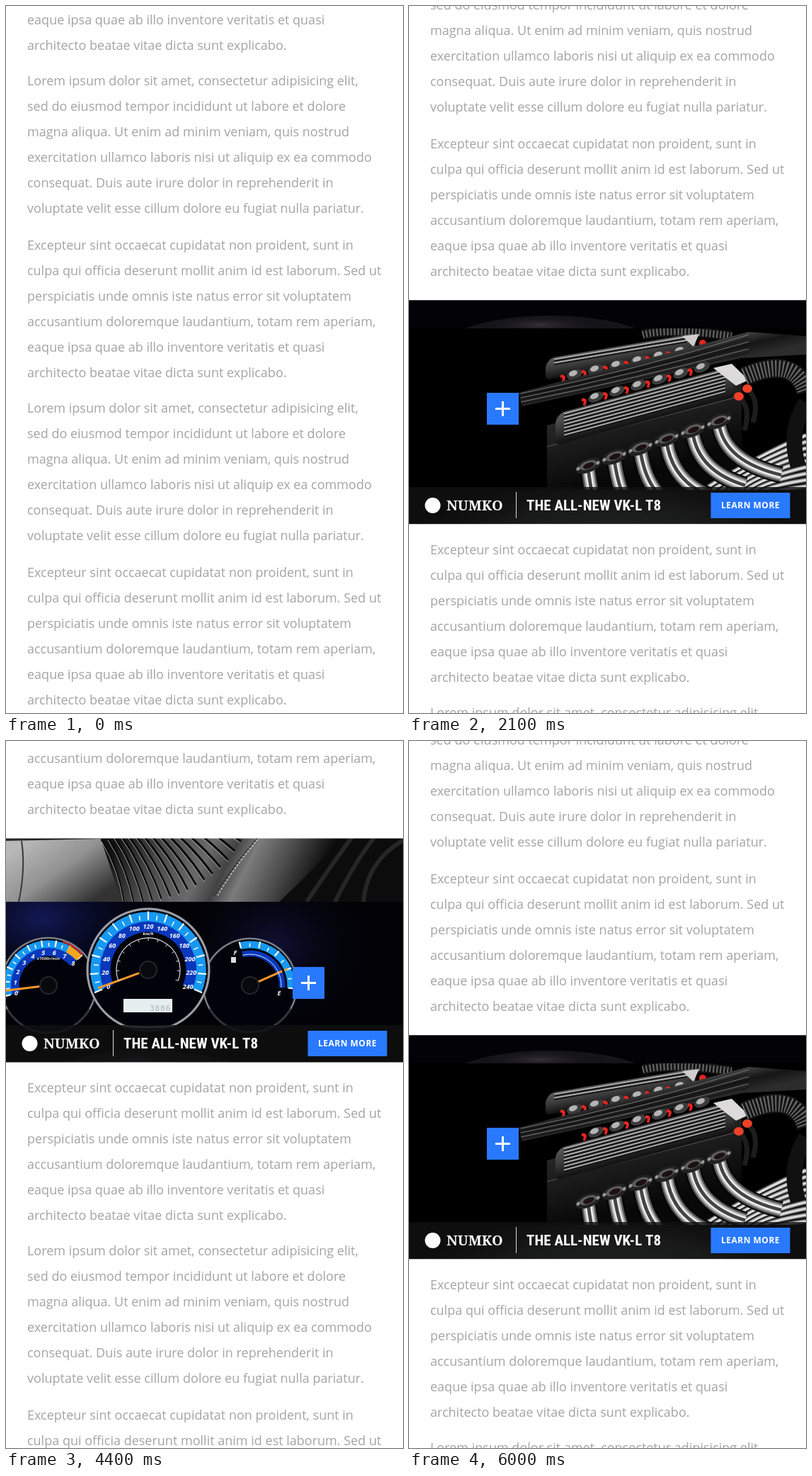
Recreate the animation shown at these times as an HTML page with a canvas. Size 561 by 998 pixels, loop 8 s.

```html
<!DOCTYPE html>
<html lang="en">
<head>
<meta charset="utf-8">
<title>Scrolling page with banner</title>
<style>
html, body { margin: 0; width: 100%; height: 100%; overflow: hidden; background: #fff; }
canvas { display: block; width: 561px; height: 998px; }
</style>
</head>
<body>
<canvas id="stage" width="561" height="998"></canvas>
<script>
const W = 561, H = 998, LOOP = 8000, BANNER = 316, BAR = 52;
const BLUE = '#2979ff';
const stage = document.getElementById('stage').getContext('2d');
const backdrop = document.createElement('canvas');
backdrop.width = W;
backdrop.height = H;
let c = backdrop.getContext('2d');

// ---------- helpers ----------
const repeat = (n, f) => { for (let i = 0; i < n; i++) f(i, i / (n - 1)); };
const rad = deg => deg * Math.PI / 180;
const polar = (x, y, r, deg) => [x + r * Math.cos(rad(deg)), y + r * Math.sin(rad(deg))];
const bend = (a, b, d, t) => a.map((v, i) => (1 - t) ** 2 * v + 2 * t * (1 - t) * b[i] + t * t * d[i]);

function rect(x, y, w, h, fill) {
  c.fillStyle = fill;
  c.fillRect(x, y, w, h);
}
function linear(x0, y0, x1, y1, ...colors) {
  const g = c.createLinearGradient(x0, y0, x1, y1);
  colors.forEach((col, i) => g.addColorStop(i / (colors.length - 1), col));
  return g;
}
// Path through midpoints, so that inner points act as soft corners.
function trace(p) {
  const n = p.length;
  c.beginPath();
  c.moveTo(p[0], p[1]);
  if (n === 4) c.lineTo(p[2], p[3]);
  for (let i = 2; i < n - 2; i += 2) {
    const k = i === n - 4 ? 1 : 0.5;
    c.quadraticCurveTo(p[i], p[i + 1], p[i] + (p[i + 2] - p[i]) * k, p[i + 1] + (p[i + 3] - p[i + 1]) * k);
  }
}
function blob(fill, ...p) {
  trace(p);
  c.fillStyle = fill;
  c.fill();
}
function poly(fill, ...p) {
  c.beginPath();
  for (let i = 0; i < p.length; i += 2) c.lineTo(p[i], p[i + 1]);
  c.fillStyle = fill;
  c.fill();
}
function line(color, width, ...p) {
  trace(p);
  c.strokeStyle = color;
  c.lineWidth = width;
  c.stroke();
}
function dashed(pattern, ...args) {
  c.setLineDash(pattern);
  line(...args);
  c.setLineDash([]);
}
function disc(x, y, r, fill, ry = r, turn = 0) {
  c.beginPath();
  c.ellipse(x, y, r, ry, turn, 0, 7);
  c.fillStyle = fill;
  c.fill();
}
function arc(x, y, r, from, to, color, width) {
  c.beginPath();
  c.arc(x, y, r, rad(from), rad(to));
  c.strokeStyle = color;
  c.lineWidth = width;
  c.stroke();
}
function ray(x, y, deg, r0, r1, color, width) {
  line(color, width, ...polar(x, y, r0, deg), ...polar(x, y, r1, deg));
}
function glow(x, y, rx, ry, ...colors) {
  c.save();
  c.translate(x, y);
  c.scale(1, ry / rx);
  const g = c.createRadialGradient(0, 0, 0, 0, 0, rx);
  colors.concat('rgba(0,0,0,0)').forEach((col, i) => g.addColorStop(i / colors.length, col));
  disc(0, 0, rx, g);
  c.restore();
}
function label(text, x, y, font, fill = '#fff', align = 'left', gap = 0) {
  c.font = font;
  c.textAlign = align;
  c.letterSpacing = gap + 'px';
  c.fillStyle = fill;
  c.fillText(text, x, y);
}
// Draws in a frame at x, y whose horizontals rise or fall by the slope.
function slanted(x, y, slope, draw) {
  c.save();
  c.transform(1, slope, 0, 1, x, y);
  draw();
  c.restore();
}
function scene(y, h, draw) {
  c.save();
  c.beginPath();
  c.rect(0, y, W, h);
  c.clip();
  rect(0, y, W, h, '#000');
  draw();
  c.restore();
}
function plus(x, y) {
  rect(x, y, 45, 45, BLUE);
  rect(x + 12, y + 21, 21, 3, '#fff');
  rect(x + 21, y + 12, 3, 21, '#fff');
}

// ---------- backdrop scenes ----------
function seat() {
  rect(0, 0, W, 227, '#0c0c0c');
  // console
  slanted(0, 38, -0.12, () => {
    rect(0, 0, 190, 46, '#242424');
    rect(0, 0, 55, 28, '#b0b0b0');
    rect(0, 9, 48, 11, '#181818');
    repeat(3, i => rect(72 + i * 38, 8, 26, 22, linear(0, 8, 0, 30, '#999', '#222')));
    rect(0, 50, 190, 3, '#777');
  });
  line('#050505', 18, 92, 8, 125, 14, 142, 34);
  line('#888', 2, 76, 4, 115, 2, 140, 20);
  // near cushion
  blob(linear(60, 82, 80, 138, '#484848', '#141414'), 0, 95, 80, 70, 214, 106, 190, 142, 0, 142);
  line('#777', 1, 80, 83, 104, 105, 128, 136);
  dashed([3, 2], '#999', 1, 88, 84, 150, 90, 212, 110);
  poly(linear(30, 140, 100, 240, '#b8b8b8', '#919191', '#333'), 0, 141, 134, 138, 164, 227, 0, 227);
  line('#3a3a3a', 2, 22, 141, 28, 180, 18, 227);
  // seat back
  poly(linear(230, 20, 400, 60, '#2c2c2c', '#8a8a8a', '#3c3c3c'), 232, 0, 430, 0, 380, 78, 240, 60);
  glow(335, 18, 70, 36, 'rgba(175,175,175,.7)');
  blob(linear(190, 40, 250, 62, '#141414', '#4c4c4c', '#111'), 190, 95, 190, 45, 222, 0, 285, 0, 248, 50, 214, 106);
  // pleats fan out from the backrest to the front edge
  poly(linear(170, 110, 340, 190, '#111', '#4a4a4a', '#6a6a6a', '#1a1a1a'), 134, 138, 214, 106, 244, 58, 378, 80, 284, 227, 164, 227);
  repeat(19, (i, t) => {
    const [x0, y0] = bend([242, 60], [216, 118], [135, 139], t);
    const [x1, y1] = bend([374, 84], [290, 236], [166, 227], t);
    const mx = (x0 + x1) / 2 + 8, my = (y0 + y1) / 2 - 5;
    line('#080808', 3, x0, y0, mx, my, x1, y1);
    line('#a0a0a0', 1, x0, y0 + 3, mx, my + 3, x1, y1 + 3);
  });
  // side bolster
  blob(linear(320, 110, 450, 175, '#151515', '#7c7c7c', '#484848', '#0c0c0c'), 284, 227, 310, 170, 380, 76, 500, 50, 552, 10, 480, 140, 386, 227);
  poly(linear(400, 0, 530, 40, '#6a6a6a', '#1c1c1c'), 408, 0, 546, 0, 506, 48, 380, 76, 432, 18);
  dashed([3, 2], '#ddd', 1, 380, 75, 500, 55, 536, 8);
  repeat(2, i => dashed([3, 2], i ? '#ccc' : '#222', 1.5, 428 + i * 5, 68, 355, 125, 294 + i * 5, 218));
  // door side
  repeat(3, i => line('#262626', 6, 561, 50 + i * 45, 510, 100 + i * 35, 425 + i * 40, 227));
  plus(258, 91);
}

function dial(d) {
  const { x, y, r, from, to, ticks, labels = [], reach } = d, span = to - from;
  disc(x, y, r, '#02030a');
  arc(x, y, r, 0, 360, '#30343c', 3);
  arc(x, y, r, 150, 390, '#7f858f', 2);
  arc(x, y, r * 0.72, from, to, '#0a37bb', r * 0.2);
  arc(x, y, r * 0.87, from, to, '#1698f2', r * 0.16);
  repeat(ticks, (i, t) => ray(x, y, from + span * t, r * 0.82, r * (i % 2 ? 0.9 : 0.96), '#fff', i % 2 ? 1.5 : 2.2));
  labels.forEach((text, i) => {
    const [u, v] = polar(x, y, reach, from + span * i / (labels.length - 1));
    label(text, u, v + 3, 'italic bold 9px "Open Sans", sans-serif', '#fff', 'center');
  });
  ray(x, y, d.needle, r * 0.16, r * d.length, '#ff9a2c', 3);
  disc(x, y, 13, '#25262c');
  disc(x, y, 11, '#08090d');
}
function dashboard() {
  rect(0, 227, W, 228, '#020207');
  glow(50, 250, 210, 130, 'rgba(22,30,105,.8)');
  glow(380, 290, 150, 130, 'rgba(20,20,64,.8)');
  const note = 'italic bold 6px "Open Sans", sans-serif';

  const rev = { x: 60, y: 345, r: 67, from: 166, to: 318 };
  dial({ ...rev, ticks: 17, labels: [...Array(9).keys()], reach: 47, needle: 173, length: 0.9 });
  arc(rev.x, rev.y, 58, 298, 318, '#f4a51c', 10);
  arc(rev.x, rev.y, 65, 288, 318, '#d72929', 2);
  label('x1000r/min', 60, 309, note, '#ddd', 'center');

  dial({ x: 345, y: 345, r: 66, from: 256, to: 364, ticks: 9, needle: 336, length: 0.87 });
  arc(345, 345, 51, 256, 364, '#02030a', 3);
  arc(345, 345, 44, 256, 364, '#c3e5ff', 1);
  label('F', 324, 302, 'italic bold 9px "Open Sans", sans-serif', '#fff', 'center');
  label('E', 386, 359, 'italic bold 9px "Open Sans", sans-serif', '#fff', 'center');
  rect(318, 305, 7, 8, '#ddd');

  const speed = [...Array(13)].map((_, i) => i * 20);
  dial({ x: 201, y: 323, r: 86, from: 157, to: 383, ticks: 25, labels: speed, reach: 61, needle: 160, length: 0.88 });
  arc(201, 323, 86, 114, 426, '#9a9fa8', 3);
  arc(201, 323, 45, 160, 380, '#d9dde4', 1.2);
  repeat(13, (i, t) => ray(201, 323, 160 + 220 * t, 41, 45, '#d9dde4', 1));
  label('km/h', 201, 274, note, '#fff', 'center');
  line('#9b9fa6', 3, 165, 402, 201, 406, 237, 402);
  rect(166, 364, 69, 19, '#e6eef0');
  label('3886', 203, 381, '11px "DejaVu Sans Mono", monospace', '#aab2b5', 'left', 1);

  disc(200, 482, 150, '#15151a', 45);
  glow(185, 450, 95, 16, 'rgba(75,65,78,.6)');
  plus(405, 319);
}

// A round tube is a stack of ever thinner strokes.
function tube(width, shades, ...p) {
  shades.forEach((shade, i) => line(shade, width * (1 - i / shades.length), ...p));
}
function hose(width, ...p) {
  line('#141414', width, ...p);
  dashed([2, 3], '#6a6a6a', width - 4, ...p);
}
function cover(w, h, ribs) {
  c.beginPath();
  c.roundRect(0, 0, w, h, [14, 6, 6, 6]);
  c.fillStyle = linear(0, 0, 0, h, '#5c5c5c', '#3a3a3a', '#111');
  c.fill();
  repeat(ribs, i => {
    line('#b4b4b4', 1.8, 12, 3 + i * 5, w - 12, 3 + i * 5);
    line('#151515', 2, 12, 5 + i * 5, w - 12, 5 + i * 5);
  });
}
function coils(x, y, slope) {
  slanted(x, y, slope, () => repeat(6, i => {
    disc(i * 30, 0, 11, '#3c3c3c', 7);
    disc(i * 30 - 2, -2, 6, '#b4b4b4', 4);
    line('#e5261f', 4, i * 30 - 20, -2, i * 30 - 12, 0, i * 30 - 17, 7);
  }));
}
function engine() {
  hose(14, 330, 464, 370, 454, 456, 466);
  slanted(193, 498, -0.17, () => cover(212, 30, 2));
  poly('#d0cccc', 386, 466, 410, 463, 402, 481);
  disc(415, 476, 5, '#e5261f');
  coils(234, 520, -0.22);
  poly(linear(300, 500, 308, 535, '#444', '#161616', '#2c2c2c'), 154, 546, 480, 460, 561, 466, 561, 492, 470, 497, 160, 565);
  repeat(6, i => line(i % 2 ? '#111' : '#777', 1, 158, 547 + i * 3, 320, 514 + i * 3, 480, 464 + i * 5));
  coils(264, 552, -0.28);
  // block
  slanted(195, 592, -0.26, () => {
    rect(0, 0, 275, 170, linear(0, 0, 0, 100, '#262626', '#080808'));
    line('#555', 1, 0, 30, 270, 30);
  });
  slanted(207, 576, -0.27, () => cover(252, 44, 7));
  // exhaust
  repeat(9, i => tube(9, ['#111', '#777', '#ddd'], 390 + i * 14, 700, 480, 640 + i * 6, 561, 606 + i * 9));
  repeat(6, j => {
    const i = 5 - j, x = 253 + i * 37, y = 649 - i * 12.6, reach = 18 + i * 14;
    tube(24, ['#050505', '#5a5a5a', '#b0b0b0', '#f0f0f0', '#444'], x, y + 4, x + 8, y + 62 - i, x + reach, y + 86 - i * 2);
    slanted(x, y, -0.3, () => {
      disc(0, 0, 18, '#222', 10);
      disc(0, -1, 12, '#5e5e5e', 6);
      disc(1, 0, 8, '#1c1110', 4);
      disc(-14, 0, 2.5, '#999');
      disc(14, 0, 2.5, '#999');
    });
  });
  // right hand fittings
  poly('#dcdada', 430, 511, 456, 505, 480, 528, 462, 536);
  line('#111', 22, 561, 560, 535, 600, 550, 650);
  hose(27, 474, 523, 545, 492, 561, 545);
  repeat(2, i => {
    const x = 466 + i * 12, y = 551 - i * 11;
    line('#1d1d1d', 7, x, y, x + 18, y + 16, x + 8, y + 48);
    disc(x, y, 7, '#ee4127', 6);
  });
  plus(110, 546);
}

function wheel(x, y) {
  arc(x, y, 51, 185, 350, '#6a6b6e', 7);
  disc(x, y, 46, '#131313');
  arc(x, y, 44, 0, 360, '#363636', 2);
  disc(x, y, 38, '#808080');
  disc(x, y, 34, '#222');
  disc(x, y, 25, '#474747');
  repeat(10, i => ray(x, y, -79 + i * 36 + (i % 2 ? 14 : 0), 6, 36, '#8c8c8c', 4.5));
  disc(x, y, 8, '#777');
  disc(x, y, 4, '#333');
}
function car() {
  blob('#070708', 26, 898, 36, 850, 60, 812, 190, 785, 250, 752, 350, 742, 420, 782, 515, 786, 545, 840, 520, 900, 280, 908);
  line('#8f8f92', 1.4, 196, 784, 260, 750, 350, 742, 430, 783);
  blob(linear(120, 795, 130, 830, '#2f3033', '#050506'), 76, 820, 110, 798, 220, 788, 180, 816, 100, 826);
  // glass
  blob('#1b1c1e', 206, 784, 250, 758, 290, 757, 250, 790);
  blob(linear(270, 760, 360, 790, '#252628', '#55575b', '#202123'), 262, 791, 285, 758, 355, 758, 372, 792);
  line('#9a9a9a', 1.5, 366, 768, 390, 774, 418, 794);
  // flank
  poly(linear(185, 800, 385, 870, '#2a2b2d', '#85888c', '#2c2e31', '#6f7276'), 190, 830, 220, 796, 385, 796, 402, 812, 362, 890, 204, 880);
  blob('#0b0b0d', 200, 878, 212, 822, 300, 858, 382, 832, 350, 896, 230, 890);
  blob(linear(230, 862, 350, 880, '#6a6c70', '#202124'), 226, 880, 290, 850, 362, 870, 320, 898, 240, 892);
  repeat(2, i => line('#0a0a0a', 1.4, 218 + i * 152, 796, 222 + i * 148, 840, 236 + i * 112, 880));
  line('#9a9b9e', 6, 182, 848, 190, 884, 220, 896);
  line('#737477', 2, 190, 898, 280, 903, 390, 900);
  disc(336, 814, 14, '#b9b9bb', 5);
  disc(337, 814, 12, '#333', 3.5);
  disc(252, 784, 9, '#55575a', 6);
  disc(252, 786, 8, '#151517', 5);
  repeat(6, i => {
    const x = i < 3 ? 192 : 362, y = 845 + (i % 3) * 9;
    line('#999', 1.5, x, y, x + 16, y + 2);
  });
  poly('#b0b0b0', 58, 823, 74, 812, 98, 806, 84, 816);
  line('#777', 1.5, 40, 846, 58, 830, 88, 824);
  line('#4b4b4e', 2, 42, 854, 62, 862, 76, 856);
  line('#3b3c40', 3, 430, 792, 470, 794, 516, 800);
  wheel(130, 877);
  wheel(445, 877);
}
function studio() {
  rect(0, 683, W, 315, '#050506');
  glow(290, 810, 330, 165, '#94979b', '#7d8084', '#3f4145');
  rect(0, 896, W, 102, linear(0, 896, 0, 980, '#47484a', '#2e2f31', '#0d0d0e'));
  rect(0, 896, W, 102, linear(0, 0, W, 0, 'rgba(0,0,0,.9)', 'rgba(0,0,0,.05)', 'rgba(0,0,0,.85)'));
  c.save();
  c.globalAlpha = 0.3;
  c.translate(0, 1846);
  c.scale(1, -1);
  car();
  c.restore();
  disc(285, 910, 250, '#050505', 11);
  car();
}

scene(683, 315, studio);
scene(455, 228, engine);
scene(227, 228, dashboard);
scene(0, 227, seat);

// ---------- page ----------
const lorem = [
  'Lorem ipsum dolor sit amet, consectetur adipisicing elit,',
  'sed do eiusmod tempor incididunt ut labore et dolore',
  'magna aliqua. Ut enim ad minim veniam, quis nostrud',
  'exercitation ullamco laboris nisi ut aliquip ex ea commodo',
  'consequat. Duis aute irure dolor in reprehenderit in',
  'voluptate velit esse cillum dolore eu fugiat nulla pariatur.'
];
const excepteur = [
  'Excepteur sint occaecat cupidatat non proident, sunt in',
  'culpa qui officia deserunt mollit anim id est laborum. Sed ut',
  'perspiciatis unde omnis iste natus error sit voluptatem',
  'accusantium doloremque laudantium, totam rem aperiam,',
  'eaque ipsa quae ab illo inventore veritatis et quasi',
  'architecto beatae vitae dicta sunt explicabo.'
];
const LEADING = 35.95, PERIOD = 462;

function paragraph(lines, y) {
  lines.forEach((text, i) => {
    const base = Math.round(y + i * LEADING);
    if (base > -10 && base < H + 20) label(text, 30, base, '18px "Open Sans", sans-serif', '#a4a4a4');
  });
}
function copy(top) {
  const above = top - 34.5 - 5 * LEADING, below = top + BANNER + 43;
  repeat(3, i => {
    paragraph(excepteur, above - i * PERIOD);
    paragraph(lorem, above - 232 - i * PERIOD);
    paragraph(excepteur, below + i * PERIOD);
    paragraph(lorem, below + 230 + i * PERIOD);
  });
}
function bar(y) {
  rect(0, y, W, BAR, 'rgba(17,17,17,.82)');
  disc(33.5, y + 26, 11, '#fff');
  label('NUMKO', 53, y + 33, '900 20px "Noto Serif", serif');
  rect(151, y + 7, 1, 37, '#ddd');
  c.fontStretch = 'condensed';
  label('THE ALL-NEW VK-L T8', 166, y + 33, 'bold condensed 21px "Roboto Condensed", Roboto, sans-serif');
  c.fontStretch = 'normal';
  rect(426.5, y + 8, 112, 36, BLUE);
  label('LEARN MORE', 482.5, y + 30, 'bold 12px "Open Sans", sans-serif', '#fff', 'center', 0.5);
}

// Banner tops at rest; each move takes four jumps of 100 ms.
const START = 1020.7, FIRST = 500, EVERY = 1300;
const stops = [689.8, 415.2, 183.2, 0, 415.2];
function bannerTop(t) {
  return stops.reduce((top, next, i) => {
    const step = Math.floor((t - FIRST - i * EVERY) / 100) + 1;
    return top + (next - top) * Math.max(0, Math.min(4, step)) / 4;
  }, START);
}

function draw(now) {
  const top = bannerTop(now % LOOP);
  c = stage;
  rect(0, 0, W, H, '#fff');
  copy(top);
  if (top >= H) return;
  c.save();
  c.beginPath();
  c.rect(0, top, W, BANNER);
  c.clip();
  c.drawImage(backdrop, 0, 0);
  bar(Math.min(Math.round(top) + BANNER, H) - BAR);
  c.restore();
}
const begin = performance.now();
function tick() {
  draw(performance.now() - begin);
  requestAnimationFrame(tick);
}
tick();
</script>
</body>
</html>
```
